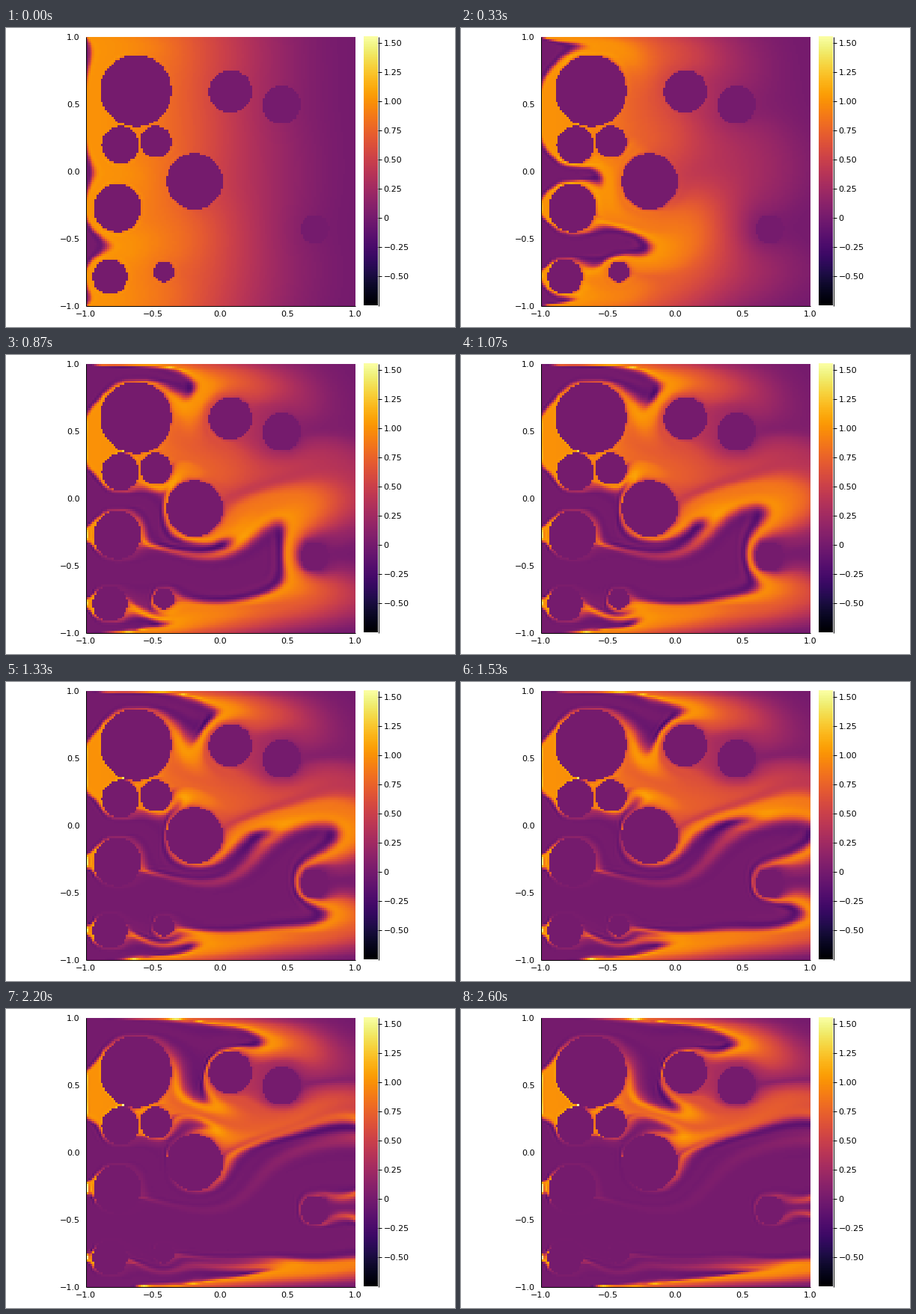
Recreate the animation shown at these times as a matplotlib script. Size 600 px wide and 400 px high, loop 2670 ms.

```python
import math

import numpy as np
import matplotlib.pyplot as plt
from matplotlib.animation import FuncAnimation

FRAMES = 40
LOOP_MS = 2670
N = 128                      # cells per side
LOW, HIGH = -0.753, 1.551    # colour range
X0, Y0, SIDE = 107, 12, 360  # plot box in pixels

# Obstacles: centre x, centre y, radius
DISCS = [
    (-0.630, 0.600, 0.266), (-0.744, 0.200, 0.139), (-0.480, 0.222, 0.118),
    (-0.194, -0.072, 0.208), (-0.767, -0.270, 0.178), (-0.822, -0.782, 0.129),
    (-0.423, -0.745, 0.077), (0.072, 0.595, 0.160), (0.452, 0.497, 0.143),
    (0.700, -0.428, 0.106),
]

centres = (np.arange(N) + 0.5) * 2 / N - 1
gx, gy = np.meshgrid(centres, centres, indexing="ij")
solid = np.zeros((N, N), bool)
for cx, cy, r in DISCS:
    solid |= (gx - cx) ** 2 + (gy - cy) ** 2 < r * r


def stream_function():
    """Slow viscous flow from left to right, at rest on walls and discs.

    Minimises the bending energy of the stream function plus a stiff
    penalty on its gradient inside the discs, by block elimination.
    """
    n, group = N + 1, 3
    blocks, size = n // group, n * group
    diag = np.zeros((blocks, size, size))
    upper = np.zeros((blocks, size, size))

    def add(i, j, m):
        s, a = divmod(i, group)
        t, b = divmod(j, group)
        if t >= s:
            part = diag[s] if t == s else upper[s]
            part[a * n:(a + 1) * n, b * n:(b + 1) * n] += m

    eye = np.eye(n)
    lap = np.eye(n, k=1) + np.eye(n, k=-1) - 4 * eye
    lap[0, 1] = lap[-1, -2] = 2
    weight = np.ones(n)
    weight[[0, -1]] = 0.5

    for k in range(n):
        ops = {k: lap}
        if k > 0:
            ops[k - 1] = eye * (2 if k == N else 1)
        if k < N:
            ops[k + 1] = eye * (2 if k == 0 else 1)
        for i, p in ops.items():
            left = weight[k] * p.T * weight
            for j, q in ops.items():
                add(i, j, left @ q)

    stiff, wall = 100.0, 1e6
    cols = np.pad(solid, ((1, 1), (0, 0)))
    rows = np.pad(solid, ((0, 0), (1, 1)))
    edge_y = stiff * (cols[1:] | cols[:-1])
    edge_x = stiff * (rows[:, 1:] | rows[:, :-1])
    grad = np.diff(eye, axis=0)
    ends = np.zeros(n)
    ends[[0, -1]] = wall
    for i in range(n):
        add(i, i, (grad.T * edge_y[i]) @ grad + np.diag(ends))
        if i < N:
            m = np.diag(edge_x[i])
            add(i, i, m)
            add(i + 1, i + 1, m)
            add(i, i + 1, -m)
            add(i + 1, i, -m)

    rhs = np.zeros((n, n))
    rhs[:, -1] = wall
    rhs = rhs.reshape(blocks, size)
    for s in range(1, blocks):
        u = upper[s - 1]
        both = np.linalg.solve(diag[s - 1], np.column_stack([u, rhs[s - 1]]))
        diag[s] -= u.T @ both[:, :-1]
        rhs[s] -= u.T @ both[:, -1]
    psi = np.zeros((blocks, size))
    psi[-1] = np.linalg.solve(diag[-1], rhs[-1])
    for s in range(blocks - 2, -1, -1):
        psi[s] = np.linalg.solve(diag[s], rhs[s] - upper[s] @ psi[s + 1])
    return psi.reshape(n, n)


psi = stream_function()
u = np.diff(psi, axis=1)     # through vertical cell faces
v = -np.diff(psi, axis=0)    # through horizontal cell faces
speed = (np.maximum(abs(u[1:]), abs(u[:-1]))
         + np.maximum(abs(v[:, 1:]), abs(v[:, :-1]))).max()


def travel_times(targets):
    """Times at which the fastest tracer of the main inlet gets to each x."""
    x = np.zeros(60)
    y = (np.linspace(-0.68, -0.40, 60) + 1) * N / 2
    goal = (np.array(targets) + 1) * N / 2
    dt = 0.3 / speed
    lead = [0.0]
    while lead[-1] < goal[-1] and len(lead) < 12000:
        i = np.clip(x.astype(int), 0, N - 1)
        j = np.clip(y.astype(int), 0, N - 1)
        a, b = x - i, y - j
        x = x + dt * ((1 - a) * u[i, j] + a * u[i + 1, j])
        y = y + dt * ((1 - b) * v[i, j] + b * v[i, j + 1])
        x = np.clip(x, 0, N)
        y = np.clip(y, 0, N)
        lead.append(max(lead[-1], x.max()))
    return np.interp(goal, lead, dt * np.arange(len(lead)))


def flux(c, vel, inflow):
    """Third-order upwind flux along the first axis."""
    p = np.pad(c, ((2, 2), (0, 0)), mode="edge")
    if inflow:
        p[:2] = 0
    far_l, l, r, far_r = p[:-3], p[1:-2], p[2:-1], p[3:]
    ahead = 0.375 * r + 0.75 * l - 0.125 * far_l
    back = 0.375 * l + 0.75 * r - 0.125 * far_r
    return np.where(vel > 0, ahead, back) * vel


fluid = ~solid


def rate(c):
    fx = flux(c, u, True)
    fy = flux(c.T, v.T, False).T
    return -(np.diff(fx, axis=0) + np.diff(fy, axis=1)) * fluid


def advance(c, span):
    steps = max(1, math.ceil(span * speed / 0.9))
    dt = span / steps
    for _ in range(steps):
        c1 = c + dt * rate(c)
        c2 = 0.75 * c + 0.25 * (c1 + dt * rate(c1))
        c = (c + 2 * (c2 + dt * rate(c2))) / 3
        c = np.clip(c, LOW, HIGH)
    return c


def simulate():
    start, middle, late = travel_times((-0.83, 0.35, 0.957))
    end = late + (late - start) / 20 * (FRAMES - 1 - 20)
    clock = np.interp(np.arange(FRAMES), (0, 10, 20, FRAMES - 1),
                      (start, middle, late, end))
    c = np.cos(math.pi * (gx + 1) / 4) ** 2 * fluid
    fields, now = [], 0.0
    for t in clock:
        c = advance(c, t - now)
        now = t
        fields.append(c.T.copy())
    return fields


fields = simulate()

plt.rcParams["font.family"] = "DejaVu Sans"
fig = plt.figure(figsize=(6, 4), dpi=100, facecolor="white")
ax = fig.add_axes([0, 0, 1, 1])
ax.axis("off")

look = dict(cmap="inferno", vmin=LOW, vmax=HIGH, origin="lower",
            aspect="auto", interpolation="nearest")
heat = ax.imshow(fields[0], extent=(X0, X0 + SIDE, Y0 + SIDE, Y0), **look)
ax.imshow(np.linspace(LOW, HIGH, 256)[:, None],
          extent=(478, 497, 371.5, Y0), **look)
ax.set_xlim(0, 600)
ax.set_ylim(400, 0)


def line(xs, ys):
    ax.plot(xs, ys, color="black", lw=0.72, solid_capstyle="butt")


def label(x, y, text, ha):
    ax.text(x, y, text.replace("-", "\u2212"), fontsize=8, ha=ha,
            va="center_baseline", color="black")


bottom = Y0 + SIDE
line([106.5, 106.5], [Y0, bottom])
line([106.5, X0 + SIDE], [bottom - 0.5, bottom - 0.5])
for value in (-1, -0.5, 0, 0.5, 1):
    shift = (value + 1) * SIDE / 2
    label(X0 + shift - 0.5, 382.5, f"{value:.1f}", "center")
    label(98.5, bottom - shift, f"{value:.1f}", "right")

line([497.5, 497.5], [Y0, 371.5])
for k in range(-2, 7):
    value = k / 4
    y = Y0 + (HIGH - value) / (HIGH - LOW) * 359.5
    line([497, 502], [y, y])
    label(504.5, y, f"{value:.2f}" if k else "0", "left")


def update(frame):
    heat.set_data(fields[frame])
    return [heat]


anim = FuncAnimation(fig, update, frames=FRAMES, interval=LOOP_MS / FRAMES,
                     repeat=True, repeat_delay=0, blit=False)
plt.show()
```
